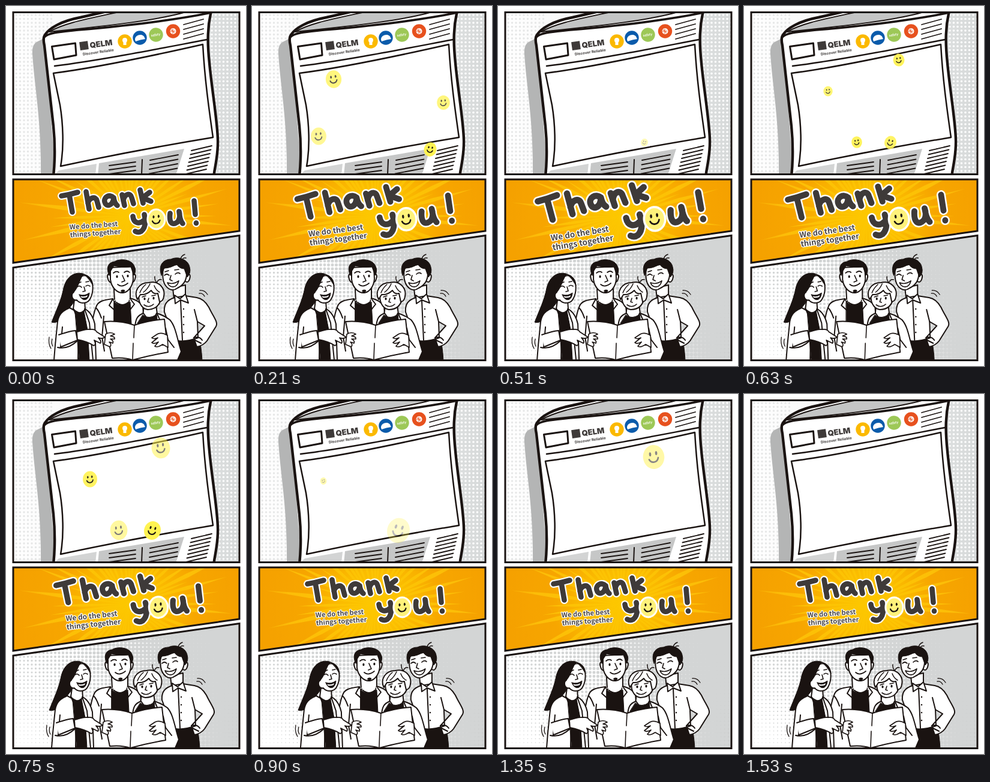
An HTML page for the animation above (1560 ms loop, 400 px wide and 600 px high).

```html
<!DOCTYPE html>
<html lang="en">
<head>
<meta charset="utf-8">
<title>Thank you</title>
<style>
html, body { margin: 0; width: 100%; height: 100%; overflow: hidden; background: #fff; }
svg { display: block; width: 100%; height: 100%; }
.ink { stroke: #1a1311; stroke-linecap: round; stroke-linejoin: round; }
.sans { font-family: "Noto Sans CJK TC", "Noto Sans CJK JP", "Noto Sans CJK SC", "Noto Sans", sans-serif; font-weight: 700; }
</style>
</head>
<body>
<svg id="stage" viewBox="0 0 400 600" xmlns="http://www.w3.org/2000/svg">
  <defs>
    <linearGradient id="grey1"><stop offset="0" stop-color="#fff"/><stop offset=".35" stop-color="#f6f6f6"/><stop offset="1" stop-color="#d6d9d9"/></linearGradient>
    <linearGradient id="grey3"><stop offset=".55" stop-color="#fff"/><stop offset=".8" stop-color="#e4e5e5"/><stop offset="1" stop-color="#c9cbcb"/></linearGradient>
    <radialGradient id="glow" gradientUnits="userSpaceOnUse" cx="205" cy="350" r="190">
      <stop offset="0" stop-color="#fdc800"/><stop offset=".3" stop-color="#fbbc00"/><stop offset=".6" stop-color="#f7a600"/><stop offset="1" stop-color="#f5a100"/>
    </radialGradient>
    <radialGradient id="beam" gradientUnits="userSpaceOnUse" cx="205" cy="350" r="190">
      <stop offset="0" stop-color="#fdc800"/><stop offset=".75" stop-color="#fcbd08"/><stop offset="1" stop-color="#f8ad05"/>
    </radialGradient>
    <clipPath id="c1"><path d="M12 10.500H389V280.500H12Z"/></clipPath>
    <clipPath id="c2"><path d="M12 289H389V375L12 428Z"/></clipPath>
    <clipPath id="c3"><path d="M12 436L389 382.500V590.500H12Z"/></clipPath>
  </defs>
  <g clip-path="url(#c1)" id="news"></g>
  <g clip-path="url(#c2)" id="burst"></g>
  <g clip-path="url(#c3)"><g id="tone"></g><g id="crew"></g></g>
  <g class="ink" fill="none" stroke-width="3" style="stroke-linejoin:miter">
    <path d="M12 10.500H389V280.500H12Z"/><path d="M12 289H389V375L12 428Z"/><path d="M12 436L389 382.500V590.500H12Z"/>
  </g>
  <g id="thanks"></g>
  <g id="faces"></g>
</svg>
<script>
const $ = id => document.getElementById(id);
const INK = '#1a1311';
const shape = (d, fill = 'none', w = 2) => `<path class="ink" d="${d}" fill="${fill}" stroke-width="${w}"/>`;
const flat = (d, fill) => `<path d="${d}" fill="${fill}"/>`;
const line = (d, w = 2) => shape(d, 'none', w);
const white = (d, w = 2) => shape(d, '#fff', w);
const black = (d, w = 1) => shape(d, INK, w);
const disc = (x, y, r, fill) => `<circle cx="${x}" cy="${y}" r="${r}" fill="${fill}"/>`;
const eye = (x, y) => `<ellipse cx="${x}" cy="${y}" rx="1.600" ry="2.200" fill="${INK}"/>`;

// parallel strokes, each one step lower
function rows(n, x1, y1, x2, y2, step, drift = 0) {
  let d = '';
  for (let i = 0; i < n; i++) {
    const s = i * drift;
    d += `M${x1 + s} ${y1 + i * step}L${x2 + s} ${y2 + i * step}`;
  }
  return line(d, 1.8);
}

function dots(x0, x1, y0, y1, step, radius, fill) {
  let d = '';
  for (let y = y0; y < y1; y += step)
    for (let x = x0; x < x1; x += step) {
      const r = radius(x, y);
      d += `M${x - r} ${y}a${r} ${r} 0 1 0 ${2 * r} 0a${r} ${r} 0 1 0 ${-2 * r} 0`;
    }
  return flat(d, fill);
}

const smiley = ring => `<ellipse rx="14.600" ry="16.400" fill="#fff352" ${ring}/>
  <g class="ink" fill="${INK}"><ellipse cx="-4.600" cy="-4" rx="1" ry="2.200" stroke-width="1"/>
  <ellipse cx="3.800" cy="-5" rx="1" ry="2.200" stroke-width="1"/>
  <path d="M-6.500 3Q-4.500 7.500 0 7Q5 6.500 6 1.500" fill="none" stroke-width="2.200"/></g>`;

$('news').innerHTML =
  flat('M12 10H389V281H12Z', 'url(#grey1)') +
  dots(17, 80, 15, 282, 6.5, () => 1.7, '#e6e7e7') +
  dots(330, 392, 15, 282, 6.5, () => 1.8, '#fff') +
  flat('M63 54L51 60Q43 64 44 80C48 140 59 190 58 281H82L70 120Z', '#b4b5b5') +
  white('M65 48C72 37 92 25 124 19L172 8H342C336 34 335 58 339 95C343 138 352 190 353 222C354 246 349 264 346 284H79C82 255 82 230 79 200C73 150 68 100 64 66Q61 53 65 48Z', 4.4) +
  shape('M72 43C96 29 128 23 188 10H300C250 24 180 32 72 43Z', '#c4c5c5', 2) +
  line('M65 51C72 44 92 43 120 40C200 33 280 24 342 11', 3.6) +
  line('M76.500 67.500L115.500 62L117 82L80 89Z', 3) +
  `<g transform="translate(124 74) rotate(-8)" fill="#3e3a39">
    <rect y="-14" width="14" height="14"/>
    <text x="16.500" y="-1.500" font-size="13" font-weight="900" font-family="Inter, sans-serif">QELM</text>
    <text x="3" y="9" font-size="6.200" font-weight="700" font-family="Inter, sans-serif">Discover Reliable</text>
  </g>` +
  disc(198, 59, 11.7, '#fbb900') + disc(223, 53, 11.7, '#0a5bab') +
  disc(250, 48, 11.7, '#9dc857') + disc(278.5, 42, 11.7, '#e7511e') +
  disc(198, 57, 4, '#fff') + flat('M195.500 60H200.500V65H195.500Z', '#fff') +
  flat('M215 56C215 47 229 45 231 53L232 55Q224 56 216 59Z', '#fff') +
  '<text transform="translate(242 51) rotate(-8)" font-size="6" font-style="italic" font-weight="700" fill="#fff" font-family="Lato, sans-serif">safety</text>' +
  disc(278.5, 42, 5, '#fff') +
  '<path d="M274 42H282M278 38V46M275 39L281 45" stroke="#e7511e" fill="none"/>' +
  rows(4, 296, 31, 329, 22, 8) +
  line('M81 100C160 90 250 72 335 56', 2.4) +
  white('M79 112C150 103 240 84 328 64C331 120 338 170 345 219C260 233 170 250 91 267C97 235 95 195 90 165Z', 2.5) +
  flat('M88 274L151 263L149 282H80Z', '#d3d4d4') + flat('M155 262L297 238L283 282H153Z', '#c6c7c7') +
  rows(3, 172, 266, 216, 260, 7) + line('M227 256L226 282', 2) + rows(4, 240, 257, 287, 248, 7.5, -.5) +
  rows(7, 309, 241, 343, 233, 6.5, -1.5);

let rays = '';
for (let i = 0; i < 52; i++) {
  const a = (i + .25 * Math.sin(i * 5)) * Math.PI / 26, len = 145 + 42 * Math.sin(i * 2.4), w = .032;
  const at = (r, b) => `${(205 + r * Math.cos(b)).toFixed(1)} ${(350 + r * Math.sin(b)).toFixed(1)}`;
  rays += `M205 350L${at(len * .6, a - w)}L${at(len, a)}L${at(len * .6, a + w)}Z`;
}
$('burst').innerHTML = flat('M12 289H389V428H12Z', 'url(#glow)') + flat(rays, 'url(#beam)');

// dots grow to the upper right until they merge
$('tone').innerHTML = flat('M12 380H389V592H12Z', 'url(#grey3)') +
  dots(17, 394, 386, 594, 6.5, (x, y) => Math.max(.6, 1 + 3.2 * x / 388 + (490 - y) / 130), '#d3d5d5');

const girl =
  black('M128 446C111 442 100 454 96 470C92 491 84 506 76 527C86 530 96 520 102 508L113 494L128 456Z') +
  white('M114 490L112 505Q122 517 132 506L131 492Z') +
  white('M106 503C94 508 88 514 86 526L82 565L80 590H150L148 530Q144 512 132 505L126 514Z') +
  black('M115 508Q122 516 130 509L136 540L139 590H122Z') +
  line('M112 504L121 525L120 590M131 505L139 528L145 590M94 535L91 568M86 569Q103 573 119 558') +
  white('M88 548C100 544 110 541 116 541L119 557L92 568') +
  white('M118 543C127 541 134 538 140 539Q149 538 151 543L165 552Q161 555 154 553Q160 559 157 562L147 557Q151 565 146 566C140 562 130 558 119 556Z', 1.8) +
  white('M127 450C117 455 112 467 113 477Q108 480 111 487Q113 491 118 490C123 497 135 496 139 490C145 481 146 468 143 459C140 451 132 448 127 450Z') +
  black('M130 447C123 453 122 466 114 476L110 473C106 459 116 444 130 447Q143 450 145 466Q139 455 130 447Z') +
  black('M122 481Q131 484 139 478C138 493 126 493 122 481Z') +
  flat('M124 483.500Q131 485.500 136 482L135 485Q130 487 126 486Z', '#fff') +
  line('M119 468Q123 465 126 469M133 467Q136 464 140 467M130 468L132 475L128 476M120 462L125 460M133 460L138 459', 1.6) +
  line('M72 552Q70 563 75 571M77 555Q75 562 78 567', 1.3);

const man =
  white('M180 472L181 491Q194 505 207 491L207 470Z') +
  white('M178 488C162 490 153 492 150 502C143 520 142 545 143 555L148 590H235L228 500Q220 490 207 487L194 520Z') +
  black('M180 494Q194 503 207 493L209 530H180Z') +
  line('M178 488L172 499L181 507M207 488L214 497L207 506M163 517L160 552L164 575M150 503Q155 508 159 520') +
  '<path d="M180 490Q194 500 207 489" fill="none" stroke="#fff" stroke-width="2" stroke-dasharray="1.5 2"/>' +
  white('M174 446Q167 446 170 455Q172 462 176 460M211 446Q218 446 215 455Q213 461 210 460') +
  white('M174 436L174 456C176 471 187 479 195 478C204 477 211 467 212 455L211 434Z') +
  black('M172 449C166 437 170 427 181 426C190 420 210 422 214 434Q218 441 213 449L208 435Q194 437 180 433L175 441Z') +
  black('M192 474Q195 472 198 474L196 478H193Z') +
  line('M179 445Q184 441 188 444M197 444Q202 440 206 444M194 449L198 458L193 460M186 464Q193 470 203 462', 1.7) +
  eye(185, 451) + eye(203, 450);

const bob =
  white('M230 500L228 516Q240 532 252 514L250 498Z') +
  white('M229 512C219 516 216 521 215 535L218 590H286L292 576C285 554 283 534 273 523Q262 515 251 512L242 530Z') +
  black('M228 515Q238 523 251 514L253 529H219Z') +
  line('M252 513L258 527L256 545M266 537L270 556L280 569') +
  white('M222 477C219 492 225 504 236 506C249 506 257 499 259 484L256 472Z') +
  white('M219 489C212 475 222 461 238 461C254 457 266 470 263 484Q262 492 256 493L253 479Q246 481 242 474Q234 482 224 481Z') +
  line('M240 463Q236 472 229 477M233 464Q226 470 223 478M247 466Q250 474 256 477M251 461Q247 456 248 451M252 460Q254 455 259 456', 1.5) +
  line('M227 485L233 483M243 483L249 482M238 487L236 493L239 494M230 498Q238 504 246 497', 1.6) +
  eye(231, 488) + eye(246, 487);

const tall =
  white('M278 470L280 489Q289 497 299 486L299 465Z') +
  black('M273 554H322Q326 570 327 592H286Z') +
  white('M281 486C268 490 263 497 264 510L273 535L272 556Q297 562 320 553L319 526L331 533L313 553L318 568Q329 566 335 558L350 534C354 527 346 519 338 502Q330 488 318 486L299 483Z') +
  white('M281 482L282 496L291 490L304 495L299 480L290 488Z') +
  line('M291 491L294 557M319 526L314 506M313 553Q322 550 327 557M315 557L325 562') +
  [505, 518, 531, 544].map(y => disc(296, y, 1.2, INK)).join('') +
  white('M301 447Q309 445 306 455Q304 462 299 459') +
  white('M262 437C260 452 262 465 271 471Q278 476 286 470C296 465 301 457 301 446L295 428Z') +
  black('M259 449C253 432 262 422 275 422C287 416 304 423 306 435Q309 445 302 452L297 438Q289 438 284 430Q275 437 264 437Z') +
  line('M291 422Q292 416 298 414M295 421Q297 419 300 420', 1.5) +
  line('M264 449Q268 445 272 449M282 447Q286 443 290 446M275 449L273 456L277 458M265 443L271 441M281 440L288 439', 1.7) +
  white('M269 461Q278 465 288 458Q285 469 277 468Q271 467 269 461Z', 1.6) +
  line('M323 474Q331 473 336 481M322 479Q328 478 331 484', 1.3);

const paper =
  white('M164 526Q190 524 214 532Q238 524 264 522L270 577Q240 582 211 590Q197 585 177 587Z') +
  line('M214 532L213 553M212 562L211 589', 1.6) +
  white('M166 547Q174 542 181 547L174 550Q182 551 181 555L174 555Q180 558 178 562L172 560Q177 565 173 568L164 564Z', 1.7) +
  white('M269 549Q259 543 252 547L243 553Q246 556 253 553L243 561Q246 564 254 560L248 567Q252 570 261 564L270 569Z', 1.7);

$('crew').innerHTML = man + girl + tall + bob + paper;

const word = 'M93 319Q106 317 120 313M106 317L111 346' +
  'M134 312L139 341M137 331C140 321 150 319 152 327L155 338' +
  'M180 322C173 315 163 321 165 329C167 338 178 337 180 322Q181 331 186 335' +
  'M194 317L198 335M196 327C198 315 208 313 210 322L213 332' +
  'M224 309L229 331M240 313L228 322L242 328' +
  'M212 353C213 364 222 367 230 360M231 350C234 363 232 373 226 378Q221 381 216 378' +
  'M274 348C272 363 277 368 284 364C290 361 291 352 289 345C290 356 292 362 295 365' +
  'M314 327L316 350M317.500 364V364.500';
const pen = (c, w) => `<path d="${word}" fill="none" stroke="${c}" stroke-width="${w}" stroke-linecap="round" stroke-linejoin="round"/>`;
$('thanks').innerHTML = `<g transform="translate(-.5 -2.500)">${pen('#fff', 13)}${pen('#3e3a39', 8.6)}
  <g transform="translate(251 358)">${smiley('style="fill:#fff27a" stroke="#fff" stroke-width="3"')}</g></g>
  <g class="sans" font-size="11.200" fill="#4a4645" stroke="#fff" stroke-width="2.400" stroke-linejoin="round" paint-order="stroke" transform="translate(106 372.500) rotate(-4)">
  <text>We do the best</text><text y="13.200">things together</text></g>`;

// x, y, size, start, life, tilt
const pops = [
  [136, 122, .84, 3, 300, -4], [319, 161, .69, 3, 300, 0], [111, 217, .78, 1, 280, 0], [297, 239, .84, 30, 360, 14],
  [244, 227.5, 1, 460, 500, 18], [140, 142, .83, 515, 380, 0], [258, 90, .91, 519, 300, -4], [188, 227, .85, 519, 300, -3],
  [119, 145, .83, 855, 350, -8], [298, 162, 1, 910, 400, 10], [259.5, 105, 1.03, 955, 500, -5]
];
$('faces').innerHTML = pops.map(() => `<g>${smiley('')}</g>`).join('');
const faces = [...$('faces').children];

// sideways sway of the group: time, offset
const sway = [[0, 0], [210, -8], [465, -15.7], [750, -4], [960, 2.3], [1110, 3], [1350, 1], [1560, 0]];
function swayAt(t) {
  const slope = i => {
    const a = sway[i - 1], b = sway[i + 1];
    return a && b ? (b[1] - a[1]) / (b[0] - a[0]) : 0;
  };
  let i = 0;
  while (i < sway.length - 2 && t >= sway[i + 1][0]) i++;
  const [t0, a] = sway[i], [t1, b] = sway[i + 1], h = t1 - t0, u = (t - t0) / h, v = 1 - u;
  return v * v * (1 + 2 * u) * a + u * u * (3 - 2 * u) * b + h * u * v * (v * slope(i) - u * slope(i + 1));
}

const LOOP = 1560, STEP = 30;
function draw(t) {
  const p = t < 870 ? 1.05 * Math.sin(Math.PI * t / 870) ** 1.3 : 0;
  $('thanks').setAttribute('transform', `translate(209.5 336) rotate(${-5.3 * p}) scale(${1 + .21 * p}) translate(-209.5 -336)`);
  $('crew').setAttribute('transform', `translate(${swayAt(t)} 0)`);
  pops.forEach(([x, y, k, start, life, tilt], i) => {
    const u = (t - start) / life, on = u > 0 && u < 1;
    faces[i].setAttribute('display', on ? 'inline' : 'none');
    if (!on) return;
    faces[i].setAttribute('opacity', Math.min(1, u < .5 ? .2 + 2 * u : 2.4 * (1 - u)));
    faces[i].setAttribute('transform', `translate(${x} ${y}) rotate(${tilt}) scale(${k * (4.5 + 17.5 * u) / 15.5})`);
  });
}

const begin = performance.now();
function tick() {
  const t = (performance.now() - begin) % LOOP;
  draw(Math.floor(t / STEP) * STEP);
  requestAnimationFrame(tick);
}
draw(0);
requestAnimationFrame(tick);
</script>
</body>
</html>
```
